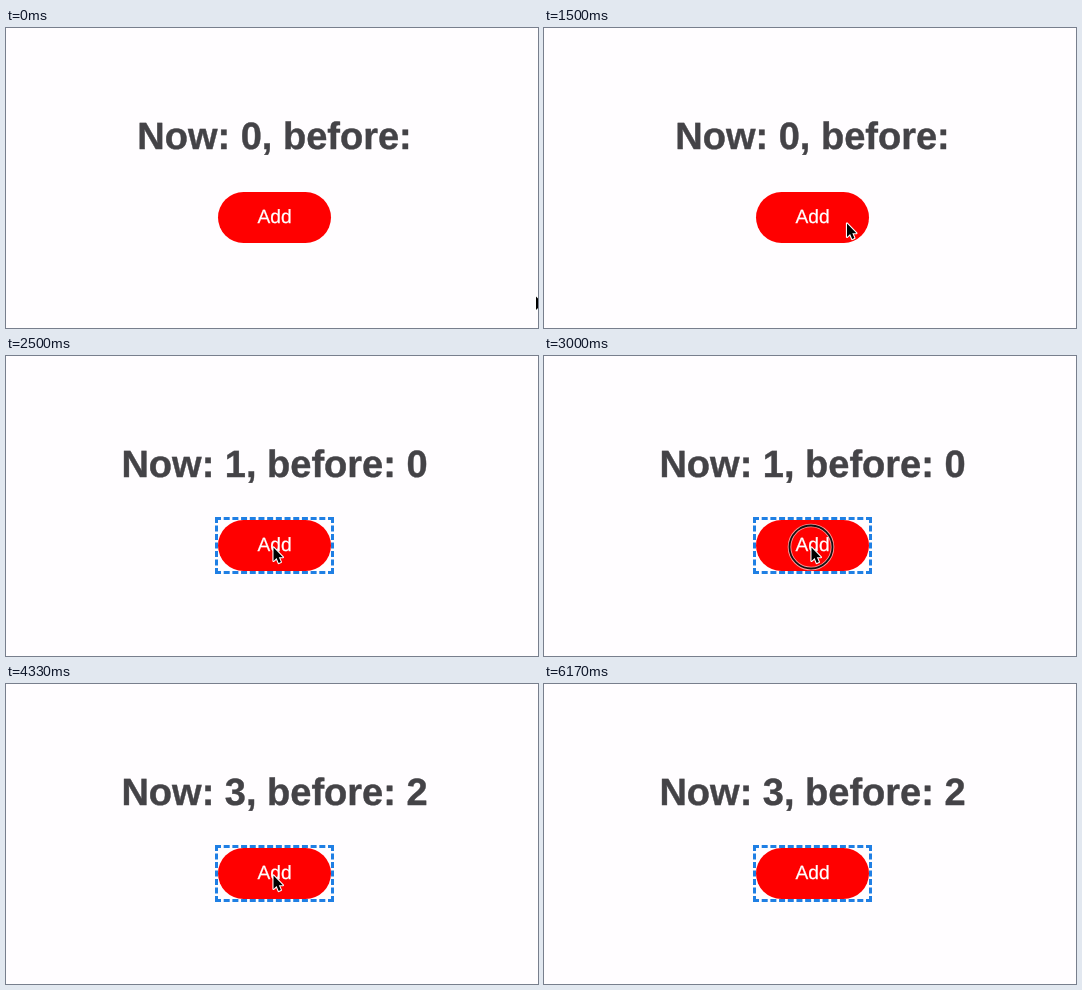
An HTML page for the animation above (6340 ms loop, 532x300 px).

```html
<!DOCTYPE html>
<html lang="en">
<head>
<meta charset="utf-8">
<title>Counter</title>
<style>
  html, body { margin: 0; width: 100%; height: 100%; overflow: hidden; background: #fffdff; }
  body {
    position: relative; font-family: Arial, "Liberation Sans", sans-serif;
    text-rendering: geometricPrecision;
  }
  h1 {
    position: absolute; left: 2.5px; top: 84px; width: 532px; margin: 0;
    font-size: 38px; line-height: 50px; text-align: center; white-space: nowrap;
    color: #444347; -webkit-text-stroke: .4px #444347;
  }
  #focus { position: absolute; left: 212px; top: 164px; width: 113px; height: 51px; }
  #focus.on { outline: 3px dashed #1f7fe4; }
  #add {
    height: 51px; border-radius: 25.5px; background: #f00; color: #fff;
    font-size: 19.2px; line-height: 51px; text-align: center;
    -webkit-text-stroke: .25px #fff;
  }
  svg { position: absolute; left: 0; top: 0; }
</style>
</head>
<body>
<h1 id="label">Now: 0, before:</h1>
<div id="focus"><div id="add">Add</div></div>
<svg width="532" height="300" viewBox="0 0 532 300">
  <g id="ring" fill="none" visibility="hidden">
    <circle cx="267" cy="191" r="21.5" stroke="#fff" stroke-opacity=".6" stroke-width="3.6"/>
    <circle cx="267" cy="191" r="21.5" stroke="#111" stroke-width="1.8"/>
  </g>
  <path id="cursor" d="M0 0V13.4L3.1 10.6L5.2 15.5L7.4 14.6L5.3 9.7H9.4Z"
        fill="#000" stroke="#fff" stroke-width="2.2" stroke-linejoin="round" paint-order="stroke"/>
</svg>
<script>
  const LOOP = 6340;
  const get = id => document.getElementById(id);
  const label = get('label'), focus = get('focus'), ring = get('ring'), cursor = get('cursor');

  // time, x, y of the pointer tip
  const path = [
    [680, 530, 268.5], [1000, 440, 239], [1250, 350, 208], [1500, 303, 195.5],
    [1750, 267.5, 191.5], [4340, 267.5, 191.5], [4840, 292, 229]
  ];
  const presses = [[1830, 2330], [2830, 3330], [3670, 4000]];
  const counts = [2500, 3500, 4000];
  const pointerGone = 5000;

  function pointerAt(t) {
    const i = path.findIndex(p => p[0] > t);
    if (i === 0) return path[0].slice(1);
    if (i < 0) return path[path.length - 1].slice(1);
    const a = path[i - 1], b = path[i];
    const k = (t - a[0]) / (b[0] - a[0]);
    return [a[1] + (b[1] - a[1]) * k, a[2] + (b[2] - a[2]) * k];
  }

  // Six poses a second, on 10 ms boundaries
  function snap(t) {
    const step = Math.floor((Math.floor(t / 10) * 10 + 5) * 0.006);
    return Math.round(step * 100 / 6) * 10;
  }

  const show = (el, on) => el.setAttribute('visibility', on ? 'visible' : 'hidden');

  function draw() {
    const t = snap(performance.now() % LOOP);
    const n = counts.filter(c => t >= c).length;
    const text = `Now: ${n}, before:${n ? ' ' + (n - 1) : ''}`;
    if (label.textContent !== text) label.textContent = text;
    focus.classList.toggle('on', t >= presses[0][0]);
    show(ring, presses.some(([down, up]) => t >= down && t < up));
    show(cursor, t < pointerGone);
    cursor.setAttribute('transform', `translate(${pointerAt(t)})`);
    requestAnimationFrame(draw);
  }
  draw();
</script>
</body>
</html>
```
